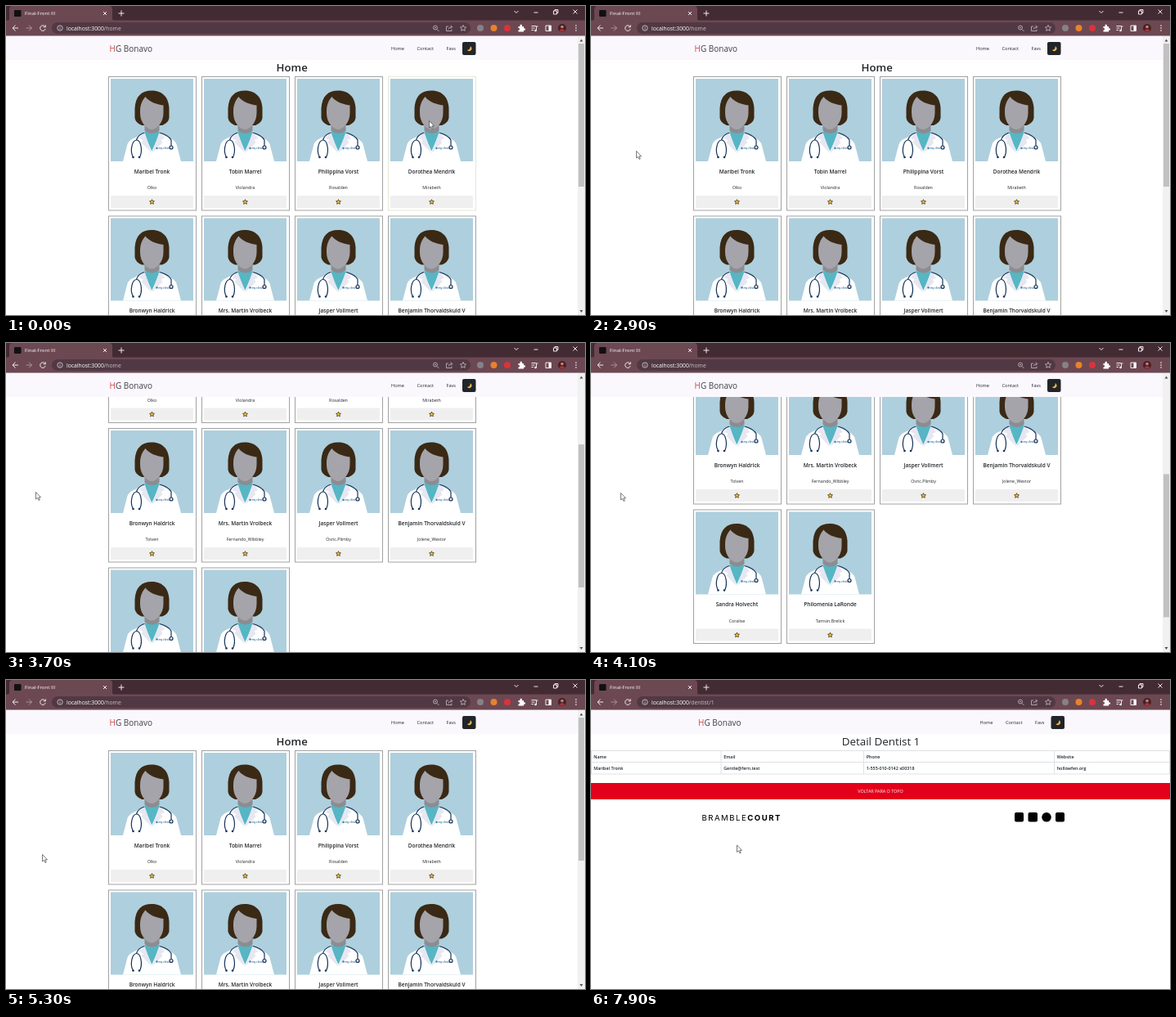
An HTML page for the animation above (8 s loop, 708 px wide and 378 px high).

```html
<!DOCTYPE html>
<html lang="en">
<head>
<meta charset="utf-8">
<title>Dentist list</title>
<style>
  html, body { margin: 0; width: 100%; height: 100%; overflow: hidden; background: #fff; }
  svg { display: block; width: 708px; height: 378px; }
  text { font-family: "Open Sans", "Noto Sans", sans-serif; fill: #212529; }
  .mid { text-anchor: middle; }
  .semi { font-weight: 600; }
  .line { fill: none; stroke: #f1e9ec; stroke-width: 1; }
</style>
</head>
<body>
<svg id="stage" viewBox="0 0 708 378" xmlns="http://www.w3.org/2000/svg"></svg>
<script>
const LOOP = 8000, STEP = 100, DETAIL_AT = 7200, DATA_AT = 7300, MAX_SCROLL = 288;
const BORDER = '#a2a2a2', HOVER_BORDER = '#e6e8d6';

const people = [
  ['Maribel Tronk', 'Olko'], ['Tobin Marrel', 'Violandra'],
  ['Philippina Vorst', 'Rosalden'], ['Dorothea Mendrik', 'Mirabeth'],
  ['Bronwyn Haldrick', 'Tolven'], ['Mrs. Martin Vrolbeck', 'Fernando_Wibbley'],
  ['Jasper Vollmert', 'Osric.Plimby'], ['Benjamin Thorvaldskuld V', 'Jolene_Wextor'],
  ['Sandra Holvecht', 'Coralise'], ['Philomenia LaRonde', 'Tamsin.Brelick']
];

// [time, x, y]
const pointerKeys = [
  [0, 517, 140], [300, 430, 152], [600, 300, 172], [900, 205, 184], [1200, 140, 190],
  [1500, 50, 196], [1800, 4, 196], [1900, 34, 192], [2300, 34, 192], [2400, 35, 192],
  [2600, 35, 192], [2900, 55, 177], [3200, 36, 182], [3800, 36, 182], [4100, 36, 183],
  [4700, 36, 183], [4900, 38, 188], [5300, 44, 213], [5600, 45, 214], [6000, 130, 222],
  [6300, 186, 210], [6500, 178, 202], [6600, 178, 201], [7200, 178, 201], [7300, 178, 201.5]
];
// [time, offset]
const scrollKeys = [
  [3300, 0], [3400, 18], [3500, 62], [3600, 115], [3700, 152.5], [3800, 160], [3900, 160],
  [4000, 180], [4100, 223.5], [4200, 260], [4300, 281], [4400, MAX_SCROLL], [4700, MAX_SCROLL],
  [4800, 260], [4900, 194.5], [5000, 120], [5100, 55], [5200, 14], [5300, 0]
];

function sample(keys, t, column) {
  if (t <= keys[0][0]) return keys[0][column];
  for (let i = 1; i < keys.length; i++) {
    const a = keys[i - 1], b = keys[i];
    if (t <= b[0]) return a[column] + (b[column] - a[column]) * (t - a[0]) / (b[0] - a[0]);
  }
  return keys[keys.length - 1][column];
}

const rect = (x, y, w, h, fill, r = 0) =>
  `<rect x="${x}" y="${y}" width="${w}" height="${h}" rx="${r}" fill="${fill}"/>`;
const dot = (x, y, r, fill) => `<circle cx="${x}" cy="${y}" r="${r}" fill="${fill}"/>`;
const shape = (d, fill, extra = '') => `<path d="${d}" fill="${fill}" ${extra}/>`;
const line = (d, extra = '') => `<path class="line" d="${d}" ${extra}/>`;
const text = (x, y, size, value, cls = '', extra = '') =>
  `<text x="${x}" y="${y}" font-size="${size}" class="${cls}" ${extra}>${value}</text>`;

function star(cx, cy, r) {
  const points = Array.from({ length: 10 }, (_, i) => {
    const a = i * Math.PI / 5 - Math.PI / 2, q = i % 2 ? r * .48 : r;
    return `${(cx + q * Math.cos(a)).toFixed(2)},${(cy + q * Math.sin(a)).toFixed(2)}`;
  });
  return points.join(' ');
}

const doctor = `<g id="doctor">
  ${rect(0, 0, 101, 101, '#aecfdd')}
  ${shape('M50 14.500C38 14.500 30.500 21 29.500 36V48Q30.500 54 38 57H63Q70.500 54 71.500 48V36C70.500 21 62 14.500 50 14.500Z', '#3a2915')}
  ${shape('M15 101L20.500 80Q22 76 27 73.500L42 66H59L74 73.500Q79 76 80.500 80L86 101Z', '#fff')}
  ${shape('M40 65L50.300 88.500L61 65Z', '#56b6c4')}
  ${shape('M41.500 57H59.500V64Q51 70 41.500 64Z', '#8c8c91')}
  ${shape('M36 40C36 31 39 26 42.500 22C47 28 56 31.500 64.500 32.500V42C64.500 54 56 62 50.200 62S36 54 36 42Z', '#a4a4aa')}
  ${shape('M41 64L35 73L39.500 75L37.500 78L50.300 91ZM60 64L66 73L61.500 75L63.500 78L50.300 91Z', '#e6e7f1')}
  <g fill="none" stroke="#17345a" stroke-width="1.2" stroke-linecap="round">
    <path d="M41 66Q33 69 31.500 75M27 95C23.500 88 26 75.500 31.500 75S39 88 36 95"/>
    <path d="M60 66Q71 69 74 75V82"/>
    <circle cx="74" cy="84" r="2" fill="#dfe8ee"/>
  </g>
  ${dot(27.5, 96, 1.3, '#17345a')}${dot(35, 96, 1.3, '#17345a')}
  ${dot(56.5, 85, 1.2, '#2f83b4')}
  ${text(58.5, 86.2, 3.2, 'my clinic', 'semi', 'style="fill:#24608c"')}
</g>`;

function card([name, user], i) {
  const x = 125 + i % 4 * 114, y = 86 + Math.floor(i / 4) * 170.5;
  return `<g transform="translate(${x} ${y})">
    <rect class="frame" x=".5" y=".5" width="107" height="163.5" fill="#fff" stroke="${BORDER}"/>
    <use href="#doctor" x="3" y="3"/>
    ${text(53.5, 118.8, 6.5, name, 'mid semi')}
    ${text(53.5, 138, 5.3, user, 'mid')}
    ${rect(3, 146, 101, 15, '#efefef', 1.5)}
    <polygon points="${star(53.5, 153.8, 3.1)}" fill="#fcc733" stroke="#3d3115" stroke-width=".8" stroke-linejoin="round"/>
  </g>`;
}

const footer = (y, width) => {
  const shift = (width - 708) / 2;
  return rect(0, y, width, 20, '#e3001b') +
    text(width / 2, y + 12, 5.4, 'VOLTAR PARA O TOPO', 'mid', 'style="fill:#fff"') +
    `<g transform="translate(${shift} ${y})">
      ${text(135.5, 45.5, 9.6, 'BRAMBLE<tspan font-weight="700">COURT</tspan>', '',
        'style="font-family:Inter,sans-serif;letter-spacing:1.5px;fill:#000"')}
      ${rect(518, 36, 11, 11.5, '#000', 2)}${rect(534.5, 36, 11.5, 11.5, '#000', 2)}
      ${dot(557, 41.8, 5.8, '#000')}${rect(568, 36, 11, 11.5, '#000', 2)}
    </g>`;
};

const nav = `${rect(0, 36, 708, 30, '#faf7fd')}
  <g id="navItems">
    ${text(126.5, 56, 10, '<tspan fill="#cf4a45">H</tspan>G Bonavo', '', 'style="fill:#3f4146"')}
    ${text(471, 54, 5.6, 'Home')}${text(502.5, 54, 5.7, 'Contact')}${text(538.5, 54, 5.6, 'Favs')}
    ${rect(558, 44, 16.5, 16, '#212529', 2)}
    ${shape('M567.600 49.200A3.100 3.100 0 1 1 563.800 53.700A3.600 3.600 0 0 0 567.600 49.200Z', '#f3b64c')}
  </g>`;

const browser = `${rect(0, 0, 708, 19, '#432b34')}
  ${shape('M2 18Q4 18 4 15V4Q4 0 8 0H126Q130 0 130 4V15Q130 18 132 18Z', '#6c4853')}
  ${rect(0, 17.5, 708, 19, '#6c4853')}
  ${rect(10, 5, 8.5, 8, '#111', 1)}
  ${text(23, 11, 6.1, 'Final-Front III', '', 'style="fill:#fff"')}
  ${line('M119 7l4 4m0-4l-4 4M137.500 9h7M141 5.500v7')}
  ${line('M621.500 6l2.500 2.500L626.500 6M645.500 8h5M669.500 6h4v4h-4zM671 6v-1.500h4v4h-1.500M693.500 4.500l5 5m0-5l-5 5', 'stroke-width=".8"')}
  ${line('M15 27H8m3.500-3.500L8 27l3.500 3.500')}
  ${line('M24.500 27h7m-3.500-3.500l3.500 3.500l-3.500 3.500', 'opacity=".45"')}
  ${line('M47.800 25.300A3.300 3.300 0 1 0 48.200 28M48.300 23.300v2.500h-2.500')}
  ${rect(56, 20, 512, 14, '#503943', 7)}
  <g class="line" style="stroke-width:.7"><circle cx="66" cy="27" r="3.200"/><path d="M66 26.500v2.300M66 25v.7"/></g>
  <text x="74" y="29.500" font-size="6.8" style="fill:#fff">localhost:3000<tspan id="path" fill="#cdbfc4"></tspan></text>
  <g class="line" style="stroke-width:.7" opacity=".85">
    <circle cx="525" cy="26.500" r="2.500"/><path d="M527 28.500l2.500 2.500M523.800 26.500h2.400"/>
    <path d="M541 25h-2.500v5.500h6.500v-2M541 28.500q.5-3 4.500-3m-1.800-2l2 2l-2 2"/>
    <polygon points="${star(559, 27.2, 3.8)}"/>
  </g>
  ${dot(580, 27, 4, '#858287')}${dot(596.5, 27, 4, '#e8822b')}${dot(613, 27, 4, '#d9343a')}
  ${shape('M626.500 25h2q-.5-2.500 1.300-2.500t1.300 2.500h2v2.200q2-.3 2 1.200t-2 1.200v1.900h-6.600v-2q1.700 0 1.700-1.200t-1.700-1.200z', '#fff')}
  ${line('M642.500 24.500h6M642.500 27h4M642.500 29.500h2.500M648.500 30v-5h2')}
  ${dot(647.5, 30, 1.3, '#fff')}
  ${line('M660 24h6.500v6.500H660z')}${rect(663.5, 24, 3, 6.5, '#fff')}
  ${dot(680, 27, 5, '#4a1f24')}${dot(680, 25.5, 1.8, '#b98a78')}${shape('M676.500 30.300Q680 25.500 683.500 30.300Q680 33.200 676.500 30.300Z', '#a8323a')}
  ${dot(697, 24, .8, '#fff')}${dot(697, 27, .8, '#fff')}${dot(697, 30, .8, '#fff')}`;

const home = `<g id="home">
  <g id="content">
    ${text(349.7, 80, 13.2, 'Home', 'mid semi')}
    ${people.map(card).join('')}
    ${footer(602.5, 699)}
  </g>
</g>`;

const columns = [
  [0, 'Name', people[0][0]], [159, 'Email', 'Gentle@fern.test'],
  [333.5, 'Phone', '1-555-010-0142 x00318'], [566.5, 'Website', 'hollowfen.org']
];
const cells = (row, y) => columns.map(c => text(c[0] + 3.2, y, 5.4, c[row], 'semi')).join('');
const detail = `<g id="detail">
  ${text(354.5, 80, 13.4, 'Detail Dentist 1', 'mid', 'style="font-weight:500"')}
  <path d="M0 86.500H708M0 100.500H708M0 115H708M.5 86V115M159 86V115M333.500 86V115M566.500 86V115M707.500 86V115" fill="none" stroke="#dee2e6"/>
  ${cells(1, 95.5)}<g id="data">${cells(2, 110)}</g>
  ${footer(126, 708)}
</g>`;

const scrollbar = `<g id="scrollbar">
  ${rect(699, 37, 9, 341, '#f1f1f1')}
  <rect id="thumb" x="700" y="46" width="7" height="175" fill="#c1c1c1"/>
  ${shape('M701.500 43.500L703.500 40.500L705.500 43.500ZM701.500 372L703.500 375L705.500 372Z', '#505050')}
</g>`;

const pointer = `<g id="pointer" stroke="#333" stroke-width=".65" stroke-linejoin="round">
  <path id="arrow" fill="#fff" d="M.5 .5V9L2.500 7.300L4 10.500L5.300 9.900L3.900 6.800H6.500Z"/>
  <path id="hand" fill="#fff" d="M0 1Q1 0 2 1V4.500L6 5.300Q7.300 5.800 7 7.500L6.200 11H.5L-2.800 7Q-2.500 5.700 0 7Z"/>
</g>`;

const stage = document.getElementById('stage');
stage.innerHTML = `<defs>${doctor}</defs>${rect(0, 0, 708, 378, '#fff')}
  ${home}${detail}${nav}${scrollbar}${browser}${pointer}`;

const el = Object.fromEntries([...stage.querySelectorAll('[id]')].map(node => [node.id, node]));
const frames = [...stage.querySelectorAll('.frame')];
const show = (node, on) => node.setAttribute('display', on ? 'inline' : 'none');
const move = (node, x, y) => node.setAttribute('transform', `translate(${x} ${y})`);

function draw(t) {
  const x = sample(pointerKeys, t, 1), y = sample(pointerKeys, t, 2);
  const scroll = sample(scrollKeys, t, 1);
  const onDetail = t >= DETAIL_AT, onLink = t >= 6600 && !onDetail;

  show(el.home, !onDetail);
  show(el.scrollbar, !onDetail);
  show(el.detail, onDetail);
  show(el.data, t >= DATA_AT);
  show(el.hand, onLink);
  show(el.arrow, !onLink);
  el.path.textContent = onDetail ? '/dentist/1' : '/home';

  move(el.navItems, onDetail ? 4.5 : 0, 0);
  move(el.content, 0, -scroll);
  move(el.pointer, x, y);
  el.thumb.setAttribute('y', 46 + scroll * .512);

  frames.forEach((frame, i) => {
    const left = 125 + i % 4 * 114, top = 86 + Math.floor(i / 4) * 170.5 - scroll;
    const hovered = x >= left && x <= left + 108 && y >= top && y <= top + 164;
    frame.setAttribute('stroke', hovered ? HOVER_BORDER : BORDER);
  });
}

const start = performance.now();
function tick() {
  const t = (performance.now() - start) % LOOP;
  draw(Math.floor(t / STEP) * STEP);
  requestAnimationFrame(tick);
}
tick();
</script>
</body>
</html>
```
